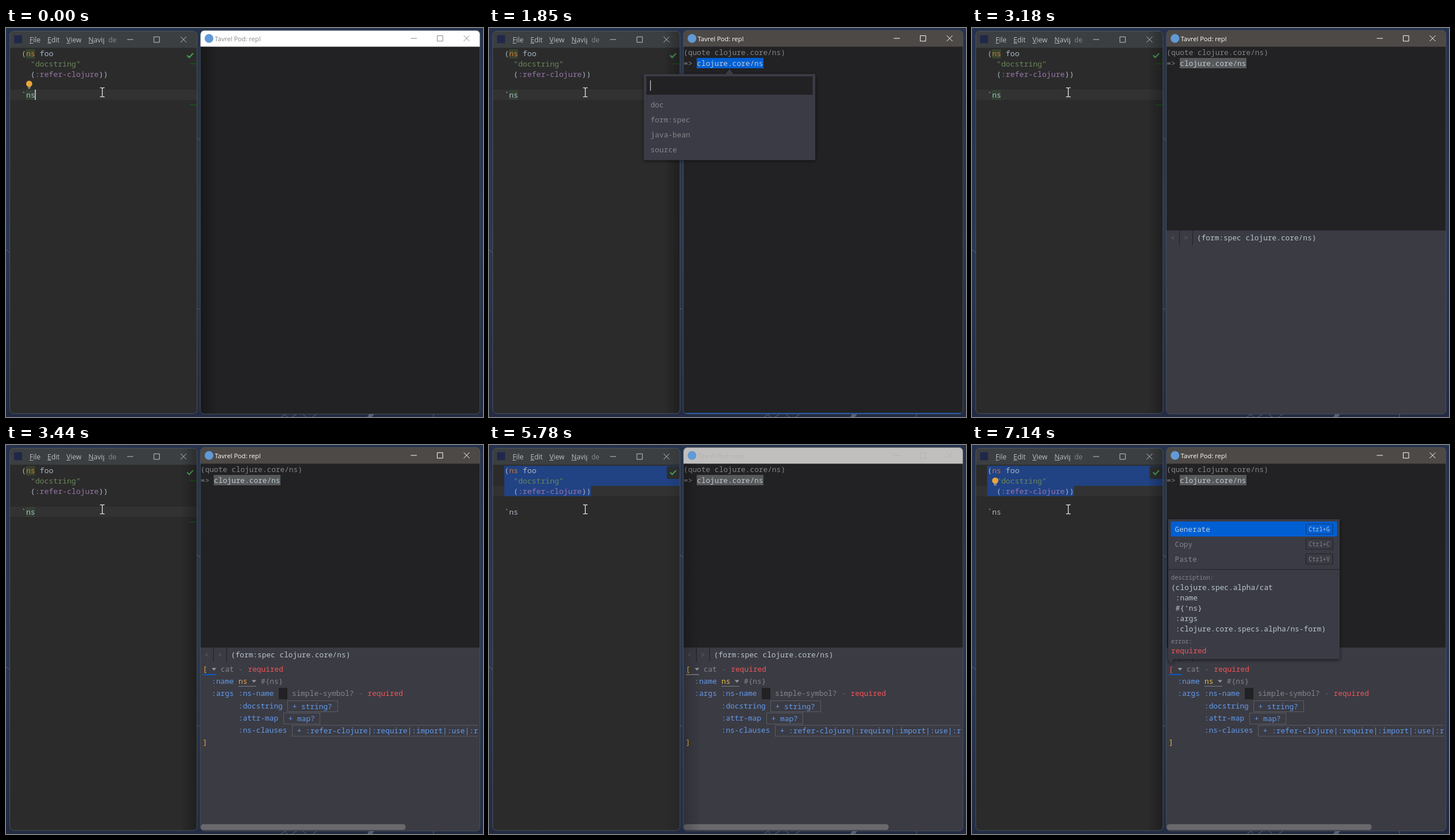
Write an HTML page that moves like this. It is 829 px wide and 676 px high and loops after 8 s.

```html
<!DOCTYPE html>
<html lang="en">
<head>
<meta charset="utf-8">
<title>Form editor</title>
<style>
  html, body { margin: 0; width: 100%; height: 100%; overflow: hidden; background: #222d45; }
  svg { display: block; width: 100vw; height: 100vh; }
  text { white-space: pre; font-variant-ligatures: none; }
  .code { font: 13.17px "Noto Sans Mono", "DejaVu Sans Mono", monospace; }
  .mono { font: 12.8px "Noto Sans Mono", "DejaVu Sans Mono", monospace; }
  .small { font: 10.25px "Noto Sans Mono", "DejaVu Sans Mono", monospace; }
  .menu { font: 12px "Open Sans", "Noto Sans", sans-serif; }
  .title { font: 11.15px "Open Sans", "Noto Sans", sans-serif; }
</style>
</head>
<body>
<svg id="stage" viewBox="0 0 829 676" preserveAspectRatio="none"></svg>
<script>
const LOOP = 8000;
const CW = 7.9, X0 = 27;
const BLUE = '#005fd3', PANEL = '#3b3b44', DARK = '#222224', KEY = '#629bea', RED = '#ee5757', DIM = '#85858a';

const rect = (x, y, w, h, fill, more = '') =>
  `<rect x="${x}" y="${y}" width="${w}" height="${h}" fill="${fill}" ${more}/>`;
const text = (x, y, s, fill, cls = 'mono', more = '') =>
  `<text x="${x}" y="${y}" class="${cls}" fill="${fill}" ${more}>${s.replace(/&/g, '&amp;').replace(/</g, '&lt;')}</text>`;
const path = (d, stroke, w = 1, more = '') =>
  `<path d="${d}" fill="none" stroke="${stroke}" stroke-width="${w}" ${more}/>`;
const shape = (d, fill, more = '') => `<path d="${d}" fill="${fill}" ${more}/>`;
const group = (id, ...parts) => `<g id="${id}">${parts.join('')}</g>`;
const code = (col, row, s, fill, id = '') =>
  text(X0 + col * CW, 49 + row * 18, s, fill, 'code', id && `id="${id}"`);
const bulb = (id, y) => group(id,
  `<circle cx="40.3" cy="${y - 1}" r="5.4" fill="#eba53a"/>`,
  rect(37.6, y + 4.5, 5.4, 1.2, '#a3a7aa'), rect(38.4, y + 6.4, 3.8, 1.2, '#a3a7aa'));
const buttons = (x, gap, y, more) => path(
  `M${x - 5} ${y}h10.5 M${x + gap - 5} ${y - 4.7}h9.6v9.6h-9.6z ` +
  `M${x + 2 * gap - 5} ${y - 5}l10 10m0-10l-10 10`, '#c2c4c6', 1, more);
const arrowDown = (x, y) => shape(`M${x} ${y}h8l-4 4.4z`, '#97979c');
const box = (x, y, w, h) => rect(x + .5, y + .5, w, h, 'none', 'stroke="#5d5d66"');

const defs = `<defs>
  <linearGradient id="sky" x1="0" y1="0" x2="0" y2="1">
    <stop offset="0" stop-color="#25324d"/><stop offset=".55" stop-color="#293852"/><stop offset="1" stop-color="#222b43"/>
  </linearGradient>
  <linearGradient id="fadeR"><stop offset="0" stop-opacity=".3"/><stop offset="1" stop-opacity="0"/></linearGradient>
  <linearGradient id="fadeL"><stop offset="0" stop-opacity="0"/><stop offset="1" stop-opacity=".28"/></linearGradient>
  <filter id="drop" x="-10%" y="-10%" width="120%" height="125%">
    <feDropShadow dx="0" dy="2" stdDeviation="3" flood-opacity=".55"/>
  </filter>
  <clipPath id="leftClip"><rect x="6" y="5" width="326" height="665" rx="7"/></clipPath>
  <clipPath id="rightClip"><rect x="338" y="4" width="486" height="667" rx="7"/></clipPath>
  <clipPath id="formClip"><rect x="338" y="377" width="482" height="280"/></clipPath>
  <clipPath id="menuClip"><rect x="140" y="5" width="31" height="29"/></clipPath>
</defs>`;

const desktop = rect(0, 0, 829, 676, 'url(#sky)') +
  path('M332 190l6 6 M0 385l6 5 M332 488h4 M478 676l7-5 4 5 M497 676l8-5 M516 671l6 5 M533 676l7-5 M743 671v5', '#5a6578') +
  shape('M628 676l3-5h9l-4 5z', '#566176');

const mnemonics = path('M41 26.5h6 M72 26.5h6.5 M105 26.5h7 M143.5 26.5h9', '#b5b8ba');
const menuBar = rect(6, 5, 326, 29, '#3c3f41') + rect(6, 34, 326, 1, '#2f3233') +
  rect(14, 12.5, 14, 14, '#20284a') +
  text(41, 24.5, 'File', '#bbbdbf', 'menu') + text(72, 24.5, 'Edit', '#bbbdbf', 'menu') +
  text(105, 24.5, 'View', '#bbbdbf', 'menu') +
  text(143.3, 24.5, 'Navigate', '#bbbdbf', 'menu', 'clip-path="url(#menuClip)"') +
  text(178, 24.5, 'de', '#878a8c', 'menu') + mnemonics + buttons(215.5, 46.5, 20);

const editor = `<g clip-path="url(#leftClip)">` +
  rect(6, 5, 326, 665, '#2b2b2b') + menuBar +
  rect(7, 0, 325, 18, '#323232', 'id="row"') +
  group('usages', rect(34.5, 37, 15.8, 16, '#37432f'), rect(34.5, 108, 15.8, 17, '#344134'),
    rect(319, 61.5, 13, 1.4, '#145c1b'), rect(319, 133, 13, 1.4, '#145c1b')) +
  group('block', rect(11.5, 37, 1, 52, '#5d6063')) +
  group('parens', rect(27, 37, 7.9, 16, '#3b514d'), rect(169.2, 72, 7.9, 17, '#3b514d')) +
  group('picked', shape('M26.5 36H332V71H177.2V89H26.5z', '#214283')) +
  code(0, 0, '(', '#a9b7c6', 'open') + code(1, 0, 'ns', '#cc7832') + code(4, 0, 'foo', '#a9b7c6') +
  code(2, 1, '"docstring"', '#6a8759') +
  code(2, 2, '(', '#a9b7c6') + code(3, 2, ':refer-clojure', '#9876aa') +
  code(17, 2, ')', '#a9b7c6') + code(18, 2, ')', '#a9b7c6', 'close') +
  code(0, 4, '`ns', '#a9b7c6') +
  bulb('bulbLow', 98) + bulb('bulbHigh', 63) +
  group('badge', rect(309, 37, 22, 22, '#2d2f30', 'rx="3"')) +
  path('M314.8 47.5l3.6 3.6 6.8-7', '#499c54', 2.2) +
  rect(0, 0, 1.6, 18, '#d0d0d0', 'id="caret"') +
  rect(304, 5, 28, 665, 'url(#fadeL)', 'id="shadeL"') + '</g>' +
  rect(6.5, 5.5, 325.5, 664.5, 'none', 'rx="7" stroke="#4b5358"') +
  path('M163.5 103.8h2.7l1.2 1.2 1.2-1.2h2.7 M167.4 105v13.5 M163.5 119.7h2.7l1.2-1.2 1.2 1.2h2.7', '#e8e8e8', 1.3);

const output = group('output',
  text(338.3, 47, '(quote clojure.core/ns)', '#85868a'), text(338.3, 66, '=>', '#85868a'),
  rect(361, 52, 116, 18, BLUE, 'id="value"'), text(361.3, 66, 'clojure.core/ns', '#bccbd3'));

const panel = group('panel', rect(338, 352, 486, 319, PANEL),
  path('M360.5 352v25 M383.5 352v25', '#242428', 1.2),
  text(345, 369, '<', '#62626a'), text(368, 369, '>', '#62626a'),
  text(391, 369, '(form:spec clojure.core/ns)', '#b9c6cd'));

// Spec fields that can still be added: label, row, button x, caption
const optional = [[':docstring', 0, 489, '+ string?', 87], [':attr-map', 1, 482, '+ map?', 63],
  [':ns-clauses', 2, 497, '+ :refer-clojure|:require|:import|:use|:refer', 400]]
  .map(([label, i, x, caption, w]) => text(404, 458 + i * 21.2, label, KEY) +
    box(x, 444 + i * 21.3, w, 19) + text(x + 8.7, 458.5 + i * 21.2, caption, KEY)).join('');

const form = group('form', `<g clip-path="url(#formClip)">` +
  text(342, 394, '[', '#f0a73a', 'mono', 'id="bracket"') + rect(342, 398, 23, 1.8, BLUE, 'id="focus"') +
  arrowDown(357.5, 387.5) + text(373, 394, 'cat', DIM) + text(404, 394, '-', '#686870') + text(420.5, 394, 'required', RED) +
  text(357.5, 415, ':name', KEY) + text(404, 415, 'ns', '#f0a73a', 'mono', 'id="nsValue"') +
  rect(404, 418.7, 31, 1.2, '#77777d') + arrowDown(427, 408.5) + text(443, 415, '#{ns}', DIM) +
  text(357.5, 436, ':args', KEY) + text(404, 436, ':ns-name', KEY) + rect(474, 422, 15, 20, DARK) +
  text(497, 436, 'simple-symbol?', DIM) + text(612.5, 436, '-', '#686870') + text(628.5, 436, 'required', RED) +
  optional + text(342, 521, ']', '#f0a73a', 'mono', 'id="bracketEnd"') + '</g>',
  rect(338.5, 659, 356, 10, '#69696d', 'rx="4.5"'));

const repl = `<g clip-path="url(#rightClip)">` +
  rect(338, 4, 486, 667, DARK) + rect(338, 4, 486, 28.5, '#fff', 'id="bar"') +
  '<circle cx="352.8" cy="18.2" r="7.6" fill="#6299d6"/>' +
  text(362.8, 22.5, 'Tavrel Pod: repl', '#888', 'title', 'id="name"') +
  buttons(708.5, 46, 18, 'id="buttons"') + output + panel + form +
  rect(338, 32, 30, 640, 'url(#fadeR)', 'id="shadeR"') +
  rect(338, 668.8, 486, 2.2, '#175fbd', 'id="edge"') + '</g>' +
  rect(337.7, 4.3, 486, 666.4, 'none', 'rx="7" stroke="#53575c" stroke-opacity=".8"');

const actions = group('actions', `<g filter="url(#drop)">` +
  shape('M269 80H411l7-9 7 9H567V229.5H269z', PANEL) + '</g>',
  rect(273.5, 84, 289, 32, DARK), rect(280, 91, 1.2, 18, '#c4ccd2', 'id="searchCaret"'),
  rect(273.5, 121, 289, 26, BLUE, 'id="choice"'),
  ...['doc', 'form:spec', 'java-bean', 'source'].map((s, i) =>
    text(280.7, 138.3 + i * 26, s, DIM, 'mono', `id="item${i}"`)));

const help = group('help', `<g filter="url(#drop)">` +
  shape('M341 129H639V372H350l-4 8-5-8z', PANEL) + '</g>',
  rect(345.5, 133, 289, 26, BLUE),
  ...[['Generate', 'G'], ['Copy', 'C'], ['Paste', 'V']].map(([s, k], i) => {
    const y = 146 + i * 26, c = i ? DIM : '#b9cde0';
    return text(352.5, y + 4.5, s, c) +
      rect(580.5, y - 9, 46.5, 18, 'none', `rx="2" stroke="${i ? '#222226' : '#143a72'}" stroke-width="1.2"`) +
      text(585, y + 3.8, 'Ctrl+' + k, c, 'small');
  }),
  rect(341, 215.8, 298, 1.2, '#27272c'),
  text(346, 234, 'description:', DIM, 'small'),
  ...['(clojure.spec.alpha/cat', ':name', "#{'ns}", ':args', ':clojure.core.specs.alpha/ns-form)']
    .map((s, i) => text(i ? 353.8 : 346.2, 251.5 + i * 18, s, '#b9c6cd')),
  text(346, 344.5, 'error:', DIM, 'small'), text(346, 362, 'required', RED));

document.getElementById('stage').innerHTML = defs + desktop + editor + repl + actions + help;

const el = {};
document.querySelectorAll('[id]').forEach(n => el[n.id] = n);
const show = (id, on) => el[id].setAttribute('visibility', on ? 'inherit' : 'hidden');
const fill = (id, c) => el[id].setAttribute('fill', c);
const within = (t, a, b) => t >= a && t < b;
const mix = (a, b, k) => `rgb(${a.map((v, i) => Math.round(v + (b[i] - v) * k))})`;

// Last value whose start time has passed
const at = (t, steps) => steps.reduce((v, [start, next]) => t >= start ? next : v, steps[0][1]);

function draw(t) {
  const focus = at(t, [[0, 0], [1300, .6], [1390, 1], [4130, .65], [4210, .25], [4290, 0],
    [5780, .35], [5860, .75], [5940, 1]]);
  const rightOn = focus > .5;
  fill('bar', mix([255, 255, 255], [76, 73, 70], focus));
  fill('name', mix([136, 136, 136], [255, 255, 255], focus));
  el.buttons.setAttribute('stroke', mix([135, 135, 135], [255, 255, 255], focus));
  el.shadeL.setAttribute('opacity', focus);
  el.shadeR.setAttribute('opacity', 1 - focus);

  const row = at(t, [[0, 4], [4600, 3], [4850, 2]]);
  const col = at(t, [[0, 3], [4600, 0], [4850, 3], [4920, 19]]);
  el.row.setAttribute('y', 35 + row * 18);
  el.caret.setAttribute('x', X0 + col * CW - .6);
  el.caret.setAttribute('y', 35 + row * 18);
  show('caret', t < 130 || within(t, 610, 1070) || within(t, 4210, 5240));
  show('bulbLow', t < 760);
  show('bulbHigh', t >= 6370);
  show('usages', t < 4600);
  show('block', within(t, 4850, 5240));
  const matched = within(t, 4920, 5240);
  show('parens', matched);
  fill('open', matched ? '#ffef28' : '#a9b7c6');
  fill('close', matched ? '#ffef28' : '#a9b7c6');
  show('picked', t >= 5240);
  show('badge', t >= 5240);

  show('output', t >= 840);
  show('value', t >= 1300);
  fill('value', t < 3180 ? BLUE : '#57585a');
  show('edge', within(t, 1300, 3180));
  show('panel', t >= 3180);
  show('form', t >= 3440);
  fill('focus', rightOn ? BLUE : '#77777d');
  const accent = t < 4130 ? '#f0a73a' : '#e2bf3d';
  fill('nsValue', accent);
  fill('bracketEnd', accent);
  fill('bracket', t < 7140 ? accent : RED);

  show('actions', within(t, 1850, 3180));
  show('searchCaret', within(t, 1850, 2400));
  show('choice', within(t, 2480, 3180));
  el.choice.setAttribute('y', t < 2630 ? 121 : 147);
  fill('item0', within(t, 2480, 2630) ? '#b9cde0' : DIM);
  fill('item1', t >= 2630 ? '#b9cde0' : DIM);
  show('help', t >= 7140);
}

// Hidden groups must also hide children that set their own visibility
const origin = performance.now();
function tick() {
  const t = (performance.now() - origin) % LOOP;
  draw(t);
  if (t < 1850 || t >= 3180) ['searchCaret', 'choice'].forEach(id => show(id, false));
  if (t < 840) show('value', false);
  requestAnimationFrame(tick);
}
draw(0);
tick();
</script>
</body>
</html>
```
